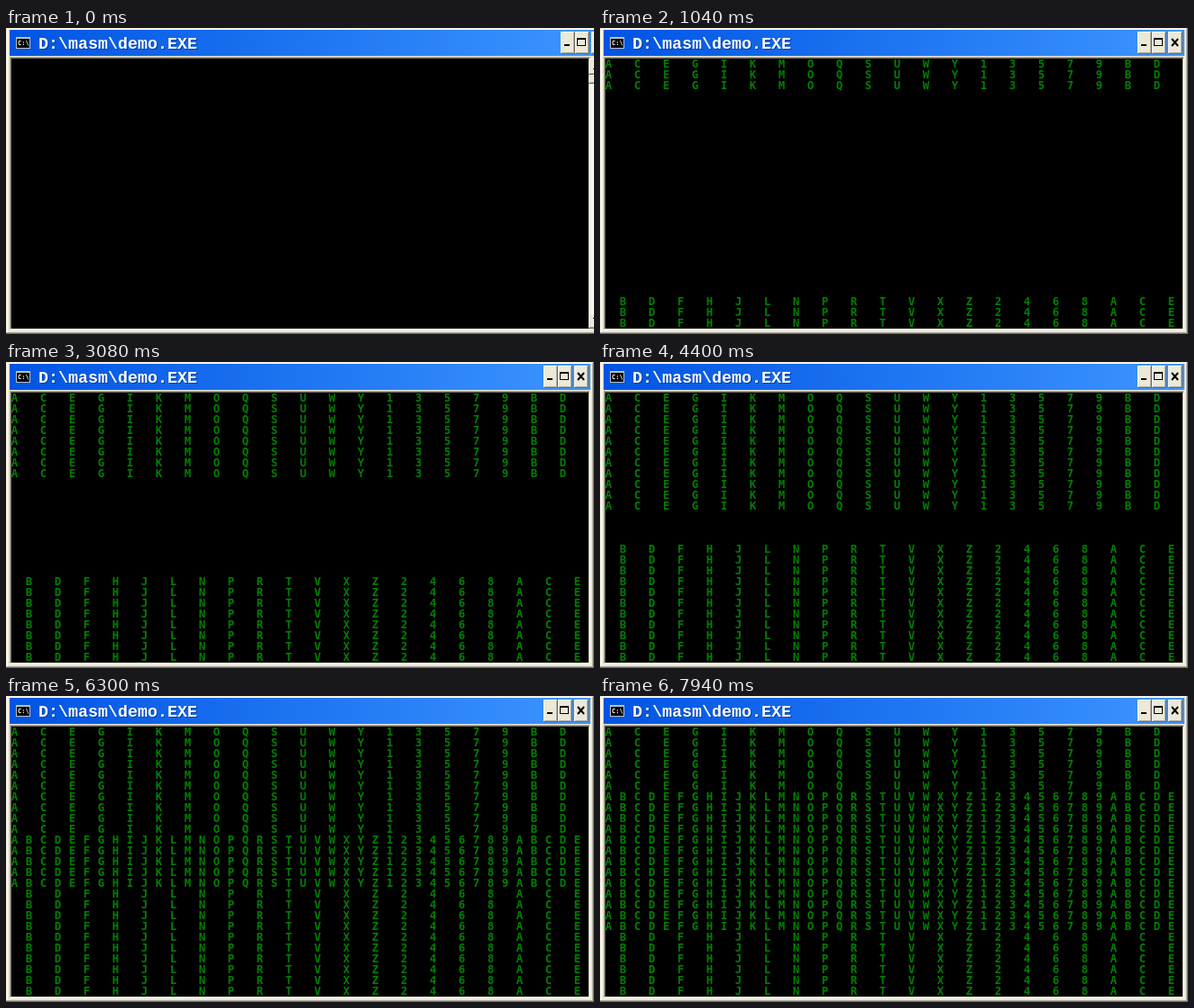
Animation of 652 by 340 pixels, one loop 8 s. Source, as an HTML page with a canvas:

```html
<!DOCTYPE html>
<html>
<head>
<meta charset="utf-8">
<title>Console letters</title>
<style>
html, body { margin: 0; width: 100%; height: 100%; overflow: hidden; background: #000; }
canvas { display: block; }
</style>
</head>
<body>
<canvas id="stage" width="652" height="340"></canvas>
<script>
const ctx = document.getElementById('stage').getContext('2d');
const LOOP = 8000, ROWS = 25, LEFT = 6, TOP = 34, ROW_H = 12, STEP = 16;
const LETTERS = 'ABCDEFGHIJKLMNOPQRSTUVWXYZ123456789ABCDE';

// Times at which one more row is filled from each end, and at which the caret lights.
const fills = [120, 580, 1040, 1440, 1840, 2300, 2690, 3080, 3540, 3940,
  4400, 4790, 5180, 5840, 6300, 6630, 7090, 7550, 7940];
const blinks = [320, 910, 1440, 1970, 2430, 3020, 4070, 4530, 5050, 5580, 6100, 7150, 7680];
const SETTLED = 60;

const FACE = '#ece9d8', GREY = '#aca899', DARK = '#716f64';

function box(color, x, y, w, h) {
  ctx.fillStyle = color;
  ctx.fillRect(x, y, w, h);
}

function raised(x, y, w, h) {
  box(DARK, x, y, w, h);
  box('#fff', x, y, w - 1, h - 1);
  box(GREY, x + 1, y + 1, w - 2, h - 2);
  box(FACE, x + 1, y + 1, w - 3, h - 3);
}

function text(str, x, y, font, color, align = 'left') {
  ctx.font = font;
  ctx.textAlign = align;
  ctx.fillStyle = color;
  ctx.fillText(str, x, y);
}

function arrow(x, y, dir) {
  for (let i = 0; i < 4; i++) box('#000', x - i, y + dir * i, 2 * i + 1, 1);
}

function titleBar(right) {
  const blue = ctx.createLinearGradient(4, 0, right, 0);
  blue.addColorStop(0, '#0054e3');
  blue.addColorStop(1, '#3d95ff');
  box(blue, 4, 2, right - 4, 29);

  box('#c0c0c0', 11, 10, 16, 13);
  box('#000', 12, 12, 14, 10);
  text('C:\\', 13, 19, 'bold 7px "DejaVu Sans Mono", monospace', '#fff');

  const font = 'bold 18.33px "Liberation Mono", monospace';
  text('D:\\masm\\demo.EXE', 37, 24, font, '#003aa8');
  text('D:\\masm\\demo.EXE', 36, 23, font, '#fff');
}

function buttons(x) {
  raised(x, 4, 16, 25);
  box('#000', x + 4, 18, 6, 2);

  raised(x + 16, 4, 16, 25);
  box('#000', x + 18, 11, 10, 9);
  box(FACE, x + 19, 13, 8, 6);

  raised(x + 34, 4, 16, 25);
  ctx.strokeStyle = '#000';
  ctx.lineWidth = 2;
  ctx.beginPath();
  ctx.moveTo(x + 38, 12);
  ctx.lineTo(x + 45, 20);
  ctx.moveTo(x + 45, 12);
  ctx.lineTo(x + 38, 20);
  ctx.stroke();
}

function chrome(settled) {
  box(FACE, 0, 0, 652, 340);
  box('#fff', 1, 1, 651, 1);
  box('#fff', 1, 1, 1, 337);
  box(GREY, 0, 338, 652, 1);
  box(DARK, 0, 339, 652, 1);
  titleBar(settled ? 648 : 652);
  buttons(settled ? 596 : 615);

  box(GREY, 4, 32, 644, 1);
  box(GREY, 4, 32, 1, 303);
  box(DARK, 5, 33, 642, 1);
  box(DARK, 5, 33, 1, 301);
  box('#fff', 4, 335, 644, 1);
  box('#000', LEFT, TOP, 640, 300);

  if (settled) {
    box('#fff', 647, 32, 1, 304);
    box(GREY, 650, 1, 1, 338);
    box(DARK, 651, 0, 1, 340);
  } else {
    box('#f6f4ec', 646, 34, 6, 300);
    raised(646, 34, 17, 18);
    raised(646, 52, 17, 10);
    raised(646, 317, 17, 17);
    arrow(654, 42, 1);
    arrow(654, 325, -1);
  }
}

function letters(count) {
  const font = 'bold 12.35px "DejaVu Sans Mono", monospace';
  for (let row = 0; row < ROWS; row++) {
    [...LETTERS].forEach((ch, i) => {
      const shown = i % 2 ? row >= ROWS - count : row < count;
      if (shown) text(ch, LEFT + i * STEP + 3.5, TOP + row * ROW_H + 10, font, '#008000', 'center');
    });
  }
}

function draw(t) {
  const last = list => list.filter(at => at <= t).pop() ?? -1;
  chrome(t >= SETTLED);
  letters(fills.filter(at => at <= t).length);
  // Each redraw hides the caret until its next blink.
  const blink = last(blinks);
  if (blink >= 0 && blink >= last(fills)) box('#c0c0c0', LEFT, 43, 8, 3);
}

const start = performance.now();
function frame() {
  draw((performance.now() - start) % LOOP);
  requestAnimationFrame(frame);
}
frame();
</script>
</body>
</html>
```
